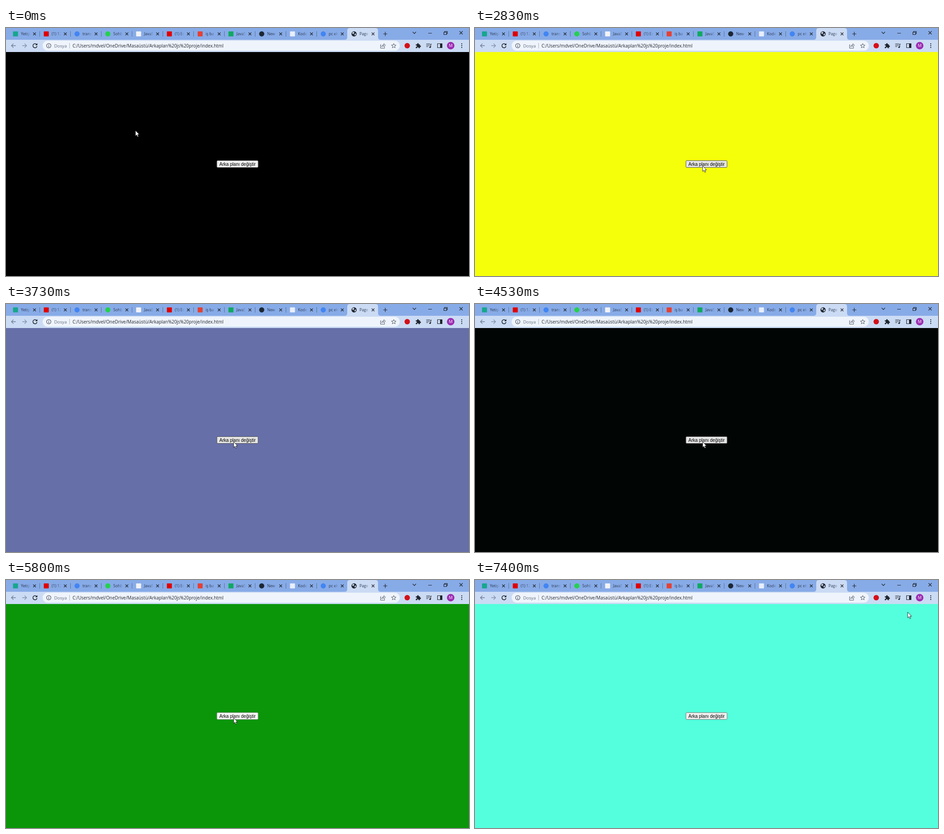
These frames come from a looping animation (1023x547 px, 7.43 s). An HTML page:

```html
<!DOCTYPE html>
<html lang="tr">
<head>
<meta charset="utf-8">
<title>Page</title>
<style>
html, body { margin: 0; width: 100%; height: 100%; overflow: hidden; background: #000; }
svg { display: block; width: 100%; height: 100%; }
text { font-family: "Open Sans", "Noto Sans", sans-serif; }
.line { fill: none; stroke: #20242c; stroke-width: 1.2; }
</style>
</head>
<body>
<svg viewBox="0 0 1023 547">
  <defs>
    <linearGradient id="fade" gradientUnits="userSpaceOnUse" x1="45" y1="0" x2="54" y2="0">
      <stop offset="0" stop-color="#27344c"/>
      <stop offset="1" stop-color="#27344c" stop-opacity="0"/>
    </linearGradient>
  </defs>

  <rect id="page" y="52" width="1023" height="495"/>

  <!-- Tab strip and toolbar -->
  <rect width="1023" height="27" fill="#87abe7"/>
  <path d="M748 26Q754 26 754 20V6Q754 0 760 0H816Q822 0 822 6V20Q822 26 828 26Z" fill="#cbdbf4"/>
  <rect y="26" width="1023" height="27" fill="#cbdbf4"/>
  <rect x="81" y="28" width="789" height="22" rx="11" fill="#eff4fc"/>
  <g id="tabs"></g>
  <path class="line" d="M833.5 13H842.5M838 8.5V17.5"/>
  <path class="line" d="M898.5 8.5 902.3 12.3 906 8.5M933 11.5H941M1002 7 1009 14M1009 7 1002 14"/>
  <path class="line" stroke-width="1" d="M967.5 9.5H973.5V14.5H967.5ZM969 9V7.5H975V12.5H974"/>

  <!-- Navigation -->
  <g fill="none" stroke-width="1.3">
    <path stroke="#707c92" d="M21.5 39H12M16.5 34.5 12 39 16.5 43.5"/>
    <path stroke="#8491a8" d="M36 39H45.5M41 34.5 45.5 39 41 43.5"/>
    <path stroke="#20242c" stroke-width="1.6" d="M67.5 36A4.6 4.6 0 1 0 68.6 40"/>
    <path fill="#20242c" d="M69.3 33.5V38H64.8Z"/>
    <circle cx="94.5" cy="39" r="4.8" stroke="#3e4654" stroke-width="1.1"/>
    <path stroke="#3e4654" stroke-width="1.2" d="M94.5 38.5V42M94.5 36V37.2"/>
    <path stroke="#aab4c5" stroke-width="1" d="M140.5 33V45"/>
  </g>
  <text x="106.5" y="42.6" font-size="9.7" fill="#626b7b">Dosya</text>
  <text x="147" y="42.6" font-size="9.9" fill="#22262e">C:/Users/mdvel/OneDrive/Masaüstü/Arkaplan%20js%20proje/index.html</text>
  <g fill="none" stroke="#4f5868" stroke-width="1">
    <path d="M829 37H827.5V44.5H836.5V42M830 41.5Q830.5 37 835 37V34.5L838.5 38 835 41.5V39Q832 39 830 41.5Z"/>
    <path id="star"/>
  </g>

  <!-- Toolbar icons -->
  <circle cx="886.5" cy="39" r="6" fill="#d50f18"/>
  <path fill="#20242c" d="M905.5 36H908.5A1.8 1.8 0 1 1 911.8 36H914.5V38.5A1.8 1.8 0 1 1 914.5 42V44.5H911.6A1.7 1.7 0 1 0 908.4 44.5H905.5V41.5A1.7 1.7 0 1 0 905.5 38.4Z"/>
  <path class="line" stroke-width="1.3" d="M928.5 35H937M928.5 38H937M928.5 41H933M938.5 42V35.5H940.5"/>
  <circle cx="937" cy="42.3" r="1.8" fill="#20242c"/>
  <path class="line" d="M953.5 34.5H963.5V43.5H953.5Z"/>
  <rect x="959" y="34.5" width="4.5" height="9" fill="#20242c"/>
  <circle cx="982.5" cy="39" r="8.3" fill="#9c2bb1"/>
  <text x="982.5" y="42.2" font-size="9" text-anchor="middle" fill="#fff">M</text>
  <g fill="#20242c"><circle cx="1007" cy="35" r="1.15"/><circle cx="1007" cy="39" r="1.15"/><circle cx="1007" cy="43" r="1.15"/></g>

  <!-- Page button -->
  <rect id="face" x="466" y="292.5" width="91" height="15" rx="1.8"/>
  <text x="511.5" y="303.6" font-size="10" text-anchor="middle" style="font-family:'Liberation Sans',Arial,sans-serif">Arka planı değiştir</text>

  <path id="cursor" d="M0 0V12.4L2.8 9.8 4.7 14.2 6.8 13.3 4.9 9H8.6Z" fill="#fff" stroke="#000" stroke-width=".8"/>
</svg>
<script>
const LOOP = 7430;
const $ = id => document.getElementById(id);

// Title, icon shape, icon colour
const tabs = [
  ["Yetişk", "square", "#16a78c"],
  ["(1) 12", "square", "#e00000"],
  ["trans", "circle", "#4285f4"],
  ["Sohb", "circle", "#25d04f"],
  ["JavaS", "square", "#f3f3f5"],
  ["(1) Ec", "square", "#e00000"],
  ["iş ba", "square", "#e34133"],
  ["JavaS", "square", "#10a860"],
  ["New ", "circle", "#1d2733"],
  ["Kodev", "square", "#e9effb"],
  ["pc ek", "circle", "#4285f4"],
  ["Page", "globe", "#20242c"]
];

function icon(shape, color) {
  if (shape === "square") return `<rect x="15.5" y="7.5" width="11" height="11" rx="1" fill="${color}"/>`;
  const disc = `<circle cx="21" cy="13" r="5.7" fill="${color}"/>`;
  const land = `<path d="M17 10 20 8.5 22 10 20 12V14L17.5 12.5ZM22 13 25 12 25 15 22.5 17Z" fill="#cbdbf4"/>`;
  return shape === "globe" ? disc + land : disc;
}

$("tabs").innerHTML = tabs.map(([title, shape, color], i) => `
  <g transform="translate(${68 * i})">
    ${icon(shape, color)}
    <text x="33" y="16" font-size="8.6" fill="url(#fade)">${title}</text>
    <path class="line" d="M60 10 66 16M66 10 60 16"/>
    ${i < 10 ? '<path d="M74.5 7V19" stroke="#587397"/>' : ""}
  </g>`).join("");

$("star").setAttribute("d", "M" + Array.from({ length: 10 }, (_, i) => {
  const a = Math.PI * (i / 5 - 0.5), r = i % 2 ? 2.3 : 5.4;
  return `${(856.7 + r * Math.cos(a)).toFixed(2)} ${(39.4 + r * Math.sin(a)).toFixed(2)}`;
}).join("L") + "Z");

// Each click sets the page colour on release
const clicks = [
  [2500, "#f5ff0a"],
  [3300, "#666fa8"],
  [4400, "#010504"],
  [5450, "#0b960a"],
  [5980, "#53ffdc"]
];
const PRESS = 190;

// Time, x, y of the pointer tip
const path = [
  [0, 286, 226], [30, 286, 226], [360, 340, 224], [660, 340, 224],
  [1030, 480, 212], [1360, 480, 212], [1670, 624, 200],
  [2100, 500, 291], [2200, 503, 304], [6600, 503, 304],
  [6700, 508, 293], [7400, 956, 71], [LOOP, 956, 71]
];

function pointer(t) {
  const i = path.findIndex(p => p[0] > t);
  const [t0, x0, y0] = path[i - 1], [t1, x1, y1] = path[i];
  const k = (t - t0) / (t1 - t0), e = k * k * (3 - 2 * k);
  return [x0 + (x1 - x0) * e, y0 + (y1 - y0) * e];
}

function draw(t) {
  const [x, y] = pointer(t);
  const last = clicks.filter(c => c[0] <= t).pop();
  const hover = x >= 466 && x <= 557 && y >= 292 && y <= 308;
  const down = clicks.some(([at]) => t >= at - PRESS && t < at);
  $("page").setAttribute("fill", last ? last[1] : "#000");
  $("face").setAttribute("fill", down ? "#f6f6f6" : hover ? "#e4e4e4" : "#efefef");
  $("face").setAttribute("stroke", down ? "#8d8d8d" : hover ? "#4f4f4f" : "#767676");
  $("cursor").setAttribute("transform", `translate(${x.toFixed(1)} ${y.toFixed(1)})`);
}

function tick() {
  draw(performance.now() % LOOP);
  requestAnimationFrame(tick);
}
tick();
</script>
</body>
</html>
```
